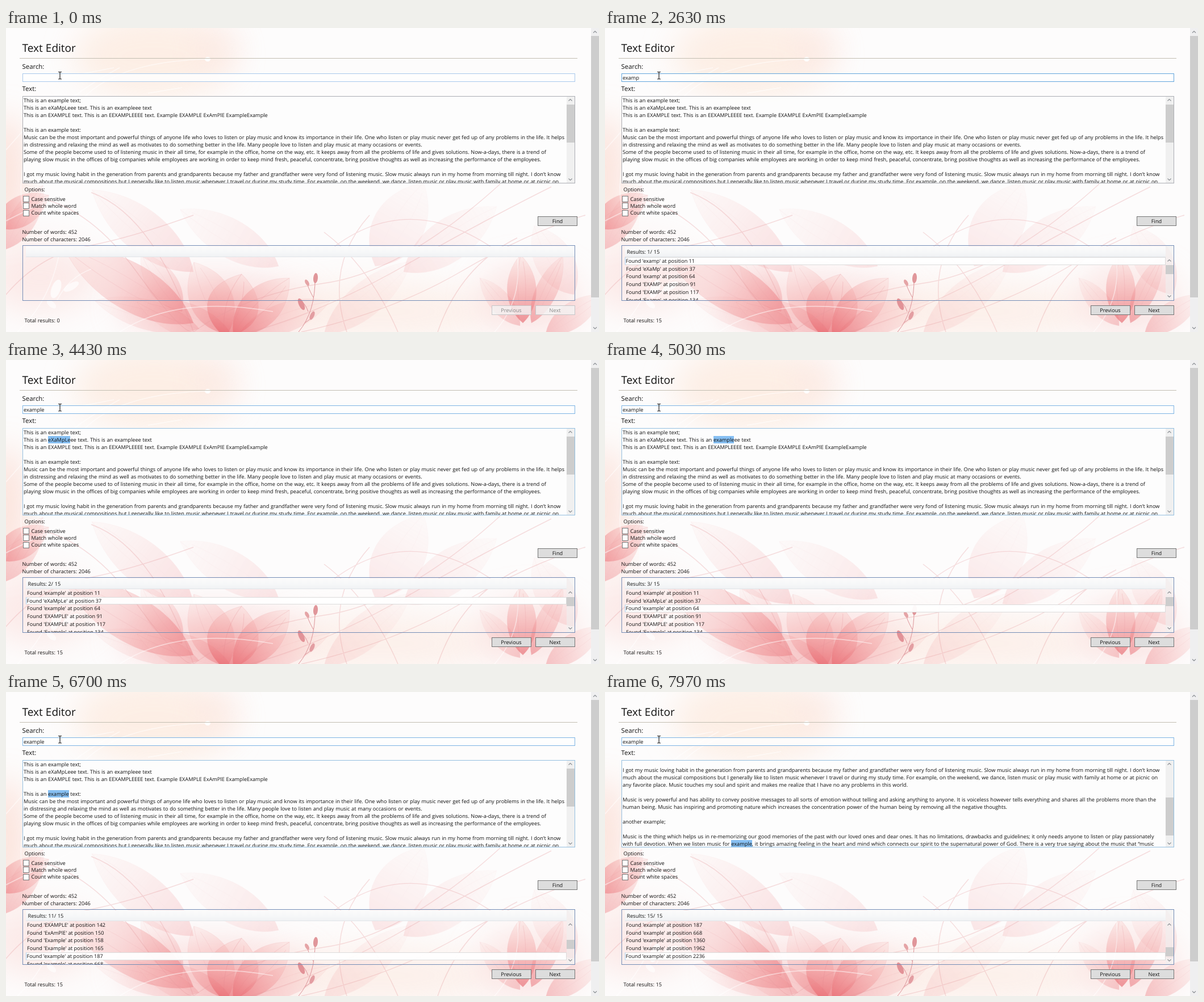
Animation of 1044x536 px, one loop 8000 ms. Source, as an HTML page:

```html
<!DOCTYPE html>
<html lang="en">
<head>
<meta charset="utf-8">
<title>Text Editor</title>
<style>
html, body { margin: 0; width: 100%; height: 100%; overflow: hidden; }
body { background: #fdfcfc; color: #111; font: 9.18px/13px "Open Sans", "Noto Sans", sans-serif;
  word-spacing: .28px; text-rendering: geometricPrecision; position: relative; }
svg { position: absolute; left: 0; top: 0; }
div { position: absolute; box-sizing: border-box; white-space: pre; }
mark { background: #86bff2; color: inherit; }
.box { border: 1px solid; overflow: hidden; }
.btn { width: 70px; height: 17px; line-height: 16px; text-align: center; border: 1px solid #757575; background: #ddd; }
.btn.off { color: #8a8a8a; border-color: #c6c6c8; background: #f4f4f4cc; }
.check { width: 11px; height: 11px; border: 1px solid #777; background: #fff; }
.thumb { background: #cdcdcd; }
.row { left: 5px; width: 952px; height: 13.8px; padding-left: 2.5px; line-height: 14px; font-size: 9.1px; word-spacing: 0; }
.row.sel { padding-left: 1px; background: #fffffff0; border: 1px solid #dcdcdc; border-left-color: #a9d2f2; line-height: 12px; }
.head { left: 5px; top: 1px; height: 19px; padding-left: 4px; line-height: 19px;
  background: linear-gradient(#fbfbfb, #f6f7f8 60%, #f0f2f4); border-bottom: 1px solid #e2e5e9; }
</style>
</head>
<body>
<svg id="art" width="1044" height="536"></svg>

<div style="left:24px;top:53px;width:982px;height:1px;background:#c3beb2"></div>
<div class="box" id="search" style="left:28.5px;top:80px;width:973px;height:15px;background:#ffffffd0;padding-left:1.5px;line-height:14px"></div>
<div class="box" id="editor" style="left:28.5px;top:119.5px;width:973px;height:154px;background:#fdfdfdf5">
  <div id="text" style="left:1.5px;top:.8px;word-spacing:.36px"></div>
  <div style="left:957px;top:0;width:15px;height:152px;background:#f0f0f0"></div>
  <div class="thumb" id="textThumb" style="left:957.5px;width:14px;height:67px"></div>
</div>
<div class="box" id="results" style="left:28.5px;top:382.5px;width:973px;height:98px;border-color:#748db6"></div>
<div class="btn" style="left:936px;top:332px">Find</div>
<div class="btn nav" style="left:854.5px;top:488.5px">Previous</div>
<div class="btn nav" style="left:931.5px;top:488.5px">Next</div>
<div style="left:1030px;top:0;width:14px;height:536px;background:#efeff0"></div>
<div class="thumb" style="left:1030px;top:14px;width:14px;height:461px"></div>
<svg id="marks" width="1044" height="536" fill="none"></svg>

<script>
const $ = id => document.getElementById(id);

// A trailing ~ marks a soft wrap
const source = `This is an example text;
This is an eXaMpLeee text. This is an exampleee text
This is an EXAMPLE text. This is an EEXAMPLEEEE text. Example EXAMPLE ExAmPlE ExampleExample

This is an example text:
Music can be the most important and powerful things of anyone life who loves to listen or play music and know its importance in their life. One who listen or play music never get fed up of any problems in the life. It helps~
in distressing and relaxing the mind as well as motivates to do something better in the life. Many people love to listen and play music at many occasions or events.
Some of the people become used to of listening music in their all time, for example in the office, home on the way, etc. It keeps away from all the problems of life and gives solutions. Now-a-days, there is a trend of~
playing slow music in the offices of big companies while employees are working in order to keep mind fresh, peaceful, concentrate, bring positive thoughts as well as increasing the performance of the employees.

I got my music loving habit in the generation from parents and grandparents because my father and grandfather were very fond of listening music. Slow music always run in my home from morning till night. I don’t know~
much about the musical compositions but I generally like to listen music whenever I travel or during my study time. For example, on the weekend, we dance, listen music or play music with family at home or at picnic on~
any favorite place. Music touches my soul and spirit and makes me realize that I have no any problems in this world.

Music is very powerful and has ability to convey positive messages to all sorts of emotion without telling and asking anything to anyone. It is voiceless however tells everything and shares all the problems more than the~
human being. Music has inspiring and promoting nature which increases the concentration power of the human being by removing all the negative thoughts.

another example;

Music is the thing which helps us in re-memorizing our good memories of the past with our loved ones and dear ones. It has no limitations, drawbacks and guidelines; it only needs anyone to listen or play passionately~
with full devotion. When we listen music for example, it brings amazing feeling in the heart and mind which connects our spirit to the supernatural power of God. There is a very true saying about the music that “music`;
const raw = source.replace(/~\n/g, ' ').replace(/\n/g, '\r\n');
const view = source.replace(/~/g, '');
const find = (text, word) => word ? [...text.matchAll(new RegExp(word, 'gi'))] : [];

const LOOP = 8000, FOCUS = 1100, WORD = 'example';
const keyTimes = [1500, 1740, 1980, 2250, 2500, 2760, 2960];
const nextTimes = [4200, ...Array.from({ length: 13 }, (_, i) => 4910 + i * 220)];
const passed = (times, t) => times.filter(v => v <= t).length;

function label(x, y, text, size = 9.18) {
  const el = document.createElement('div');
  el.textContent = text;
  el.style.cssText = `left:${x}px;top:${y - 10}px;line-height:20px;font-size:${size}px`;
  document.body.append(el);
  return el;
}

label(28.5, 35, 'Text Editor', 19);
label(28.5, 68.5, 'Search:', 11.4);
label(28.5, 107.5, 'Text:', 11.4);
label(32.5, 285, 'Options:');
['Case sensitive', 'Match whole word', 'Count white spaces'].forEach((name, i) => {
  const y = 301.5 + i * 12.3;
  label(44.5, y, name);
  const box = label(30, y, '');
  box.className = 'check';
  box.style.top = y - 5.5 + 'px';
});
label(28.5, 359.5, 'Number of words: 452');
label(28.5, 372.5, 'Number of characters: 2046');
const total = label(32.5, 516, '');

// Floral background
const petal = ([x, y, turn, len, w, alpha]) => `<g transform="translate(${x} ${y}) rotate(${turn})" opacity="${alpha}">
  <path d="M0 0C${len * .25} ${-w} ${len * .7} ${-w} ${len} 0C${len * .7} ${w} ${len * .25} ${w} 0 0" fill="url(#petal)" stroke="#e58e92" stroke-opacity=".25"/>
  <path d="M0 0Q${len * .5} ${-w * .4} ${len} 0M0 0Q${len * .5} ${w * .35} ${len * .9} ${w * .12}" fill="none" stroke="#dc767d" stroke-opacity=".3"/></g>`;
const petals = [
  [650, 420, -60, 170, 60, .14], [700, 430, -35, 200, 50, .14], [480, 420, -150, 200, 45, .15],
  [330, 430, -141, 230, 50, .2], [1000, 470, -120, 140, 45, .16], [560, 540, -40, 200, 40, .14],
  [-20, 350, -30, 110, 35, .6], [0, 390, -60, 130, 30, .35],
  [330, 520, -150, 262, 55, .5], [340, 530, -165, 190, 35, .25], [310, 500, -125, 125, 35, .3],
  [400, 545, -160, 180, 40, .35], [410, 540, -20, 170, 35, .35], [390, 540, -115, 140, 50, .45],
  [385, 545, -75, 115, 60, .75], [400, 540, -45, 140, 45, .6],
  [905, 525, -130, 110, 25, .3], [950, 540, -35, 120, 30, .35], [925, 520, -65, 130, 25, .5],
  [910, 520, -92, 120, 34, .65]];
const glow = (x, y, rx, ry, color, alpha) => `<ellipse cx="${x}" cy="${y}" rx="${rx}" ry="${ry}" fill="${color}" opacity="${alpha}" filter="url(#soft)"/>`;
const leaf = (x, y, turn, len, w, color) => `<ellipse cx="${x}" cy="${y}" rx="${len}" ry="${w}" fill="${color}" transform="rotate(${turn} ${x} ${y})"/>`;
$('art').innerHTML = `<defs>
  <linearGradient id="petal"><stop stop-color="#e8656c"/><stop offset=".5" stop-color="#f3a3a4" stop-opacity=".85"/><stop offset="1" stop-color="#f9cfcb" stop-opacity=".45"/></linearGradient>
  <filter id="soft" x="-50%" y="-50%" width="200%" height="200%"><feGaussianBlur stdDeviation="28"/></filter></defs>`
  + glow(260, 50, 140, 75, '#fdeade', .75) + glow(370, 35, 40, 50, '#fbe0dc', .35)
  + glow(0, 260, 30, 110, '#fbd3c6', .7) + glow(60, 440, 100, 60, '#fad0cc', .4)
  + glow(370, 490, 170, 50, '#f8c0bf', .5) + glow(660, 500, 200, 50, '#fce6dc', .55)
  + glow(920, 480, 90, 60, '#f9cfcc', .5)
  + petals.map(petal).join('')
  + `<g fill="none"><path stroke="#e2989b" stroke-opacity=".32" stroke-width="1.4" d="M0 470Q60 400 140 385T330 330M60 300Q150 320 230 430T330 536M150 290Q260 330 330 536M330 536Q420 470 560 450T870 275M430 536Q560 500 700 420T960 280M600 536Q560 420 640 330M690 536Q640 420 560 360M520 536Q680 500 800 430T1020 330M760 536Q800 420 900 370M560 400Q700 280 860 390"/>
  <path stroke="#fff" stroke-opacity=".5" stroke-width="1.6" d="M0 215L75 130M30 320Q15 240 60 180T200 70M60 95L190 70M130 130Q190 60 350 55M250 115L310 105M0 340L120 280M20 536Q80 480 95 390M90 480Q110 440 150 425M200 536Q300 470 470 500M860 536Q910 480 900 400"/>
  <path stroke="#dc959a" d="M515 536Q545 500 544 440M532 500Q528 488 519 480M541 475Q530 455 530 448M526 520L540 510"/></g>`
  + leaf(545, 441, -85, 9, 4, '#e0969a') + leaf(530, 449, 60, 6, 3, '#e5a4a6') + leaf(520, 487, 65, 11, 4.5, '#e29297') + leaf(539, 507, -65, 8, 3.5, '#e39ea2')
  + leaf(88, 460, -70, 17, 8, '#fffb') + leaf(115, 456, -30, 15, 6, '#fffa') + leaf(80, 487, 40, 10, 5, '#fff9') + leaf(355, 55, 0, 5, 4, '#fff');

const chevron = (x, y, dir) => `M${x - 3} ${y + dir * 1.5}l3 ${-dir * 3}l3 ${dir * 3}`;
const arrows = (x, top, bottom) => chevron(x, top, 1) + chevron(x, bottom, -1);

function drawEditor(hit) {
  let html = view, scroll = 0;
  if (hit) {
    const start = hit.index, end = start + WORD.length;
    const line = view.slice(0, start).split('\n').length - 1;
    scroll = Math.max(0, line * 13 - 140);
    html = `${view.slice(0, start)}<mark>${view.slice(start, end)}</mark>${view.slice(end)}`;
  }
  $('text').innerHTML = html;
  $('text').style.top = .8 - scroll + 'px';
  $('textThumb').style.top = 14 + scroll * .433 + 'px';
  $('editor').style.borderColor = hit ? '#94bfe0' : '#abadb3';
}

function drawResults(hits, selected) {
  const n = hits.length, scroll = Math.max(0, selected - 5);
  let html = `<div class="head" style="width:${n ? 952 : 967}px">${n ? `Results: ${selected}/ ${n}` : ''}</div>`;
  hits.slice(scroll, scroll + 6).forEach((hit, i) => {
    const sel = scroll + i + 1 === selected ? ' sel' : '';
    html += `<div class="row${sel}" style="top:${20.3 + i * 13.8}px">Found '${hit[0]}' at position ${hit.index}</div>`;
  });
  if (n) html += `<div style="left:957px;top:0;width:15px;height:96px;background:#f0f0f099"></div>
    <div class="thumb" style="left:957.5px;top:${34 + 49 * scroll / n}px;width:14px;height:${Math.max(8, 245 / n)}px"></div>`;
  $('results').innerHTML = html;
  total.textContent = 'Total results: ' + n;
  document.querySelectorAll('.nav').forEach(b => b.classList.toggle('off', !n));
  $('marks').innerHTML = `<path stroke="#8b8f94" stroke-width="1.1" d="${arrows(1037, 7, 529)}${arrows(993.5, 127, 267)}${n ? arrows(993.5, 410, 473) : ''}"/>
    <path stroke="#222" stroke-width="1.2" d="M92 77.5h2.2l.8 .8l.8-.8h2.2M95 78v11.5M92 90h2.2l.8-.8l.8 .8h2.2"/>`;
}

let last = '';
function frame() {
  const t = performance.now() % LOOP;
  const typed = passed(keyTimes, t), moves = passed(nextTimes, t);
  const since = t - Math.max(FOCUS, ...keyTimes.filter(v => v <= t));
  const caret = since >= 0 && !moves && since % 1060 < 530;
  const state = [typed, moves, caret, t >= FOCUS].join();
  if (state !== last) {
    last = state;
    const query = WORD.slice(0, typed);
    $('search').innerHTML = query + (caret ? '<span style="box-shadow:1px 0 #222">&#8203;</span>' : '');
    $('search').style.borderColor = t < FOCUS ? '#a9c9ec' : moves ? '#7eb4e4' : '#62a5dc';
    drawEditor(moves && find(view, WORD)[moves]);
    drawResults(find(raw, query), moves + 1);
  }
  requestAnimationFrame(frame);
}
frame();
</script>
</body>
</html>
```
